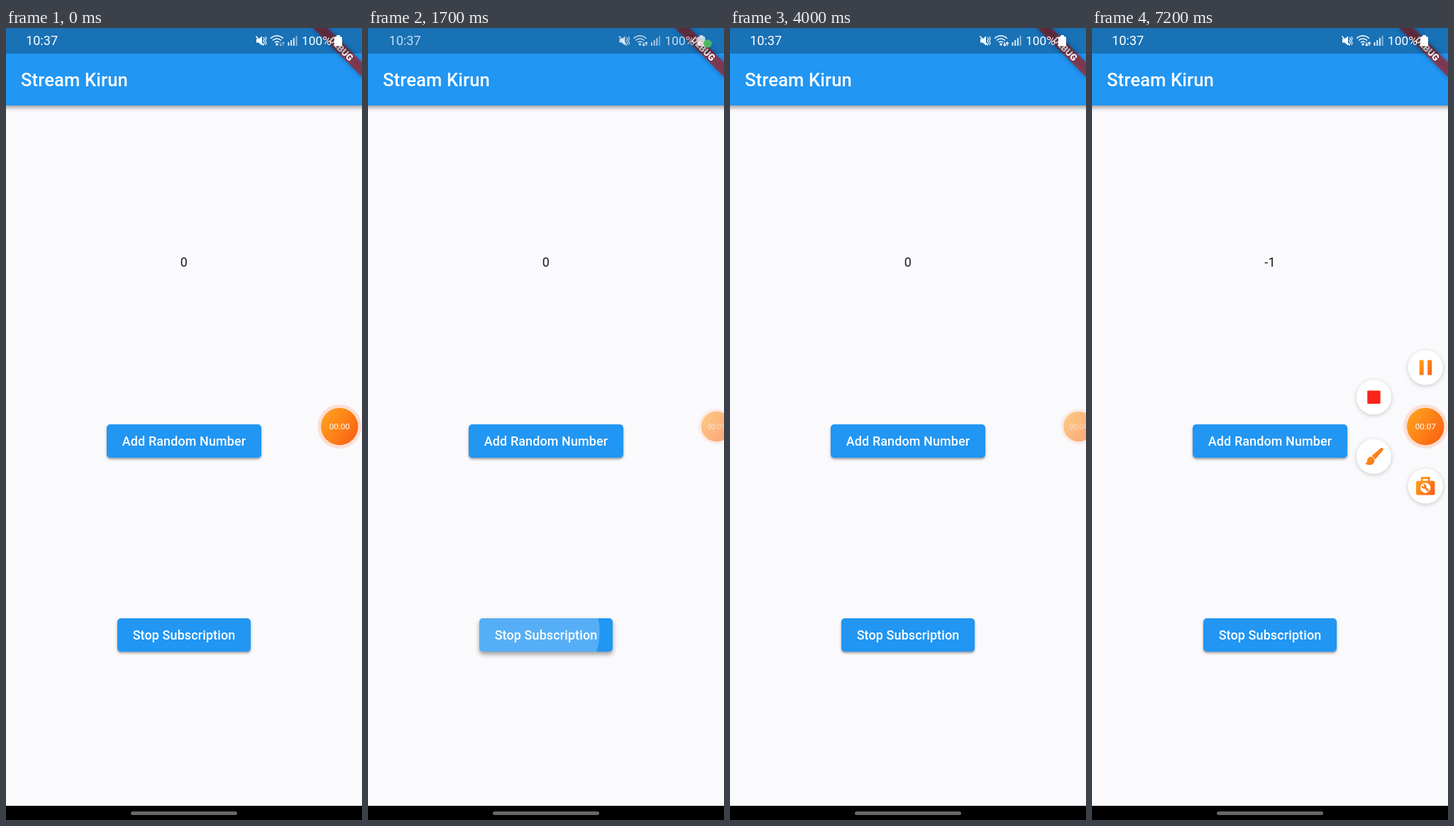
These frames come from a looping animation (502 px wide and 1115 px high, 7700 ms). An HTML page with a canvas:

```html
<!DOCTYPE html>
<html lang="en">
<head>
<meta charset="utf-8">
<title>Stream demo</title>
<style>
html, body { margin: 0; width: 100%; height: 100%; overflow: hidden; background: #faf9fc; }
canvas { display: block; width: 502px; height: 1115px; }
</style>
</head>
<body>
<canvas id="stage"></canvas>
<script>
const W = 502, H = 1115, LOOP = 7700, STEP = 100;
const BLUE = '#2196f3', PAPER = '#faf9fc';
const TICKS = [1100, 2100, 3100, 4000, 5100, 6100, 7200];
const ADD = { label: 'Add Random Number', x: 142, y: 558, w: 218, h: 47, taps: [4270], touch: [250, 581] };
const STOP = { label: 'Stop Subscription', x: 157, y: 831, w: 188, h: 47, taps: [630, 1590, 2290, 3500], touch: [238, 850] };

const canvas = document.getElementById('stage');
const c = canvas.getContext('2d');
const dpr = window.devicePixelRatio || 1;
canvas.width = W * dpr;
canvas.height = H * dpr;

const ramp = (t, a, b) => Math.min(1, Math.max(0, (t - a) / (b - a)));
const mix = (a, b, k) => a + (b - a) * k;
const easeOut = k => 1 - (1 - k) ** 3;

function group(draw) {
  c.save();
  draw();
  c.restore();
}

function text(str, x, y, size, { weight = 400, color = '#fff', align = 'left', spacing = 0 } = {}) {
  c.font = `${weight} ${size}px Roboto, sans-serif`;
  c.fillStyle = color;
  c.textAlign = align;
  c.letterSpacing = spacing + 'px';
  c.fillText(str, x, y);
}

function disc(x, y, r, fill) {
  c.beginPath();
  c.arc(x, y, r, 0, 7);
  c.fillStyle = fill;
  c.fill();
}

function box(x, y, w, h, r, fill) {
  c.beginPath();
  c.roundRect(x, y, w, h, r);
  c.fillStyle = fill;
  c.fill();
}

function shadow(alpha, blur, dy) {
  c.shadowColor = `rgba(0,0,0,${alpha})`;
  c.shadowBlur = blur * dpr;
  c.shadowOffsetY = dy * dpr;
}

function line(points, width, color) {
  c.beginPath();
  points.forEach(([x, y]) => c.lineTo(x, y));
  c.lineWidth = width;
  c.strokeStyle = color;
  c.stroke();
}

function orange(r) {
  const g = c.createLinearGradient(-r, -r * 0.7, r, r * 0.7);
  g.addColorStop(0, '#ffa41f');
  g.addColorStop(1, '#fb5f12');
  return g;
}

function appBar() {
  group(() => {
    shadow(0.38, 6, 2.5);
    c.fillStyle = BLUE;
    c.fillRect(-10, 0, W + 20, 109);
  });
  text('Stream Kirun', 21, 82, 25.6, { weight: 500, spacing: 0.15 });
}

function banner() {
  group(() => {
    c.translate(W, 0);
    c.rotate(Math.PI / 4);
    group(() => {
      shadow(0.5, 7, 0);
      c.fillStyle = 'rgba(183,28,28,.63)';
      c.fillRect(-49, 34.2, 98, 14.6);
    });
    text('DEBUG', 0, 46, 13, { weight: 900, align: 'center' });
  });
}

function ripple(b, age) {
  const fade = ramp(age, 0, 75) * (1 - ramp(age, 310, 460));
  if (age < 0 || fade === 0) return;
  const k = ramp(age, 0, 250);
  const grow = k * k * (3 - 2 * k);
  const full = Math.hypot(b.w, b.h) / 2 + 6;
  group(() => {
    c.beginPath();
    c.roundRect(b.x, b.y, b.w, b.h, 5);
    c.clip();
    const spread = mix(0.3, 1, ramp(age, 0, 150) ** 0.8);
    const x = mix(b.touch[0], b.x + b.w / 2, grow * 0.3);
    disc(x, b.touch[1], age > 200 ? full + 12 : full * spread, `rgba(255,255,255,${0.24 * fade})`);
  });
}

function button(b, t) {
  const lift = Math.max(...b.taps.map(at => Math.min(ramp(t, at, at + 180), 1 - ramp(t, at + 130, at + 310))));
  group(() => {
    shadow(0.38, mix(3.5, 9, lift), mix(2, 5, lift));
    box(b.x, b.y, b.w, b.h, 5, BLUE);
  });
  b.taps.forEach(at => ripple(b, t - at));
  text(b.label, b.x + b.w / 2, b.y + 30, 17.95, { weight: 500, align: 'center', spacing: 0.12 });
}

function muteIcon() {
  c.beginPath();
  [[353, 15.5], [356, 15.5], [361, 11.5], [361, 24.5], [356, 20.5], [353, 20.5]].forEach(p => c.lineTo(...p));
  c.fillStyle = '#fff';
  c.fill();
  line([[352.5, 11.5], [363.5, 24.5]], 1.5, '#fff');
  line([[363, 13], [364.5, 15.5], [363, 18], [364.5, 20.5], [363.5, 23]], 1.2, '#fff');
  line([[366, 12], [367, 15], [365.8, 18], [367, 21], [366, 24]], 1.1, '#fff');
}

function wifiIcon(active) {
  c.lineWidth = 1.5;
  c.strokeStyle = '#fff';
  [12.5, 8.5, 4.5].forEach(r => {
    c.beginPath();
    c.arc(382, 23.5, r, -Math.PI * 0.75, -Math.PI * 0.25);
    c.stroke();
  });
  disc(382, 23, 1.8, '#fff');
  const dim = 'rgba(255,255,255,.4)';
  line([[387.3, 20], [387.3, 25]], 1.2, active ? '#fff' : dim);
  line([[385.5, 23], [387.3, 25], [389.1, 23]], 1.2, active ? '#fff' : dim);
  line([[391, 25], [391, 20]], 1.2, active ? '#fff' : dim);
  line([[389.2, 22], [391, 20], [392.8, 22]], 1.2, active ? '#fff' : dim);
}

function statusBar(t) {
  c.fillStyle = 'rgba(0,0,0,.25)';
  c.fillRect(0, 0, W, 36);
  const back = ramp(t, 1400, 1800);
  const alpha = t < 1400 ? 1 - ramp(t, 200, 500) : back;
  if (alpha > 0) group(() => {
    c.globalAlpha = alpha;
    if (t >= 1400) c.translate(24 * (1 - back) ** 2, 0);
    text('10:37', 28, 24, 18.1);
    muteIcon();
    wifiIcon(t >= 1400);
    for (let i = 0; i < 4; i++) {
      const h = 5 + i * 3;
      box(397.5 + i * 3.7, 25 - h, 2, h, 0.5, i < 3 ? 'rgba(255,255,255,.85)' : 'rgba(255,255,255,.5)');
    }
    text('100%', 417, 24, 17.3);
    box(463, 12, 11, 13.5, 2, '#fff');
    box(466, 10, 5, 3, 1, '#fff');
  });
  micChip(t);
}

function micChip(t) {
  const enter = easeOut(ramp(t, 400, 800));
  const shrink = easeOut(ramp(t, 1300, 1600));
  const leave = ramp(t, 1800, 2100);
  if (enter === 0 || leave === 1) return;
  group(() => {
    c.globalAlpha = enter * (1 - leave);
    c.translate(mix(468, 479, shrink) + 14 * (1 - enter), mix(18, 22, shrink));
    disc(0, 0, mix(12.7, 5.8, shrink) * enter, '#4bb85f');
    c.globalAlpha *= 1 - shrink;
    c.scale(enter, enter);
    box(-2.7, -8, 5.4, 10, 2.7, '#fff');
    c.beginPath();
    c.arc(0, -0.5, 5, 0, Math.PI);
    c.lineWidth = 1.4;
    c.strokeStyle = '#fff';
    c.stroke();
    line([[0, 4.5], [0, 7.5]], 1.5, '#fff');
  });
}

function pauseIcon() {
  box(-8.5, -10.5, 6, 21, 0.5, orange(12));
  box(3, -10.5, 6, 21, 0.5, orange(12));
}

function stopIcon() {
  box(-9.2, -9.2, 18.4, 18.4, 1, '#f9241a');
}

function brushIcon() {
  c.fillStyle = orange(12);
  c.fill(new Path2D('M10-12Q12-13 13-11Q14-10 13-9L2 4L-3-1Z'));
  c.fill(new Path2D('M-4.500Q0 1 1 5.500Q0 12-6 12Q-10 12-12.500 10Q-9.500 9-9.500 5.500Q-9 1-4.500 0Z'.replace('M-4.500Q', 'M-4.5 0Q')));
}

function toolIcon() {
  const fill = orange(13);
  box(-13.2, -7.5, 26.4, 20, 2.5, fill);
  line([[-5, -7], [-5, -11.5], [5, -11.5], [5, -7]], 2.8, fill);
  disc(0, 2.5, 7.2, '#fff');
  line([[-1.5, 0.8], [4.5, 7]], 2.8, '#fb7a18');
  disc(-2, 0.2, 3.2, '#fb7a18');
  line([[-5, -2.8], [-2, 0.2]], 2, '#fff');
}

const MENU = [[-90, pauseIcon], [-150, stopIcon], [150, brushIcon], [90, toolIcon]];

function menu(t) {
  const k = easeOut(ramp(t, 6100, 6400));
  if (k === 0) return;
  MENU.forEach(([deg, icon]) => group(() => {
    const a = deg * Math.PI / 180;
    c.globalAlpha = k;
    c.translate(470.2 + 84 * k * Math.cos(a), 561.5 + 83.5 * k * Math.sin(a));
    c.scale(k, k);
    group(() => {
      shadow(0.2, 6, 1.5);
      disc(0, 0, 24.6, '#fff');
    });
    icon();
  }));
}

function recorder(t) {
  const docked = t >= 5300 ? 0 : easeOut(ramp(t, 1400, 1800));
  const r = mix(26.3, 21.3, docked);
  const seconds = TICKS.filter(at => t >= at).length;
  group(() => {
    c.translate(mix(470.3, 491.5, docked), 561);
    disc(0, 0, mix(31, 25, docked), `rgba(251,105,45,${mix(0.18, 0.09, docked)})`);
    disc(0, 0, r, PAPER);
    c.globalAlpha = mix(1, 0.55, docked);
    disc(0, 0, r, orange(r));
    text('00:0' + seconds, 0, 4.2, mix(11.7, 10, docked), { align: 'center' });
  });
}

function render(t) {
  c.setTransform(dpr, 0, 0, dpr, 0, 0);
  c.fillStyle = PAPER;
  c.fillRect(0, 0, W, H);
  appBar();
  text(t < 4400 ? '0' : '-1', 251, 336, 17.95, { color: '#1c1b1f', align: 'center', spacing: 0.3 });
  button(ADD, t);
  button(STOP, t);
  banner();
  statusBar(t);
  menu(t);
  recorder(t);
  c.fillStyle = '#000';
  c.fillRect(0, 1095, W, 20);
  box(176, 1103, 150, 5, 2.5, '#686868');
}

const start = performance.now();
function frame() {
  const t = (performance.now() - start) % LOOP;
  render(Math.floor(t / STEP) * STEP);
  requestAnimationFrame(frame);
}
frame();
</script>
</body>
</html>
```
